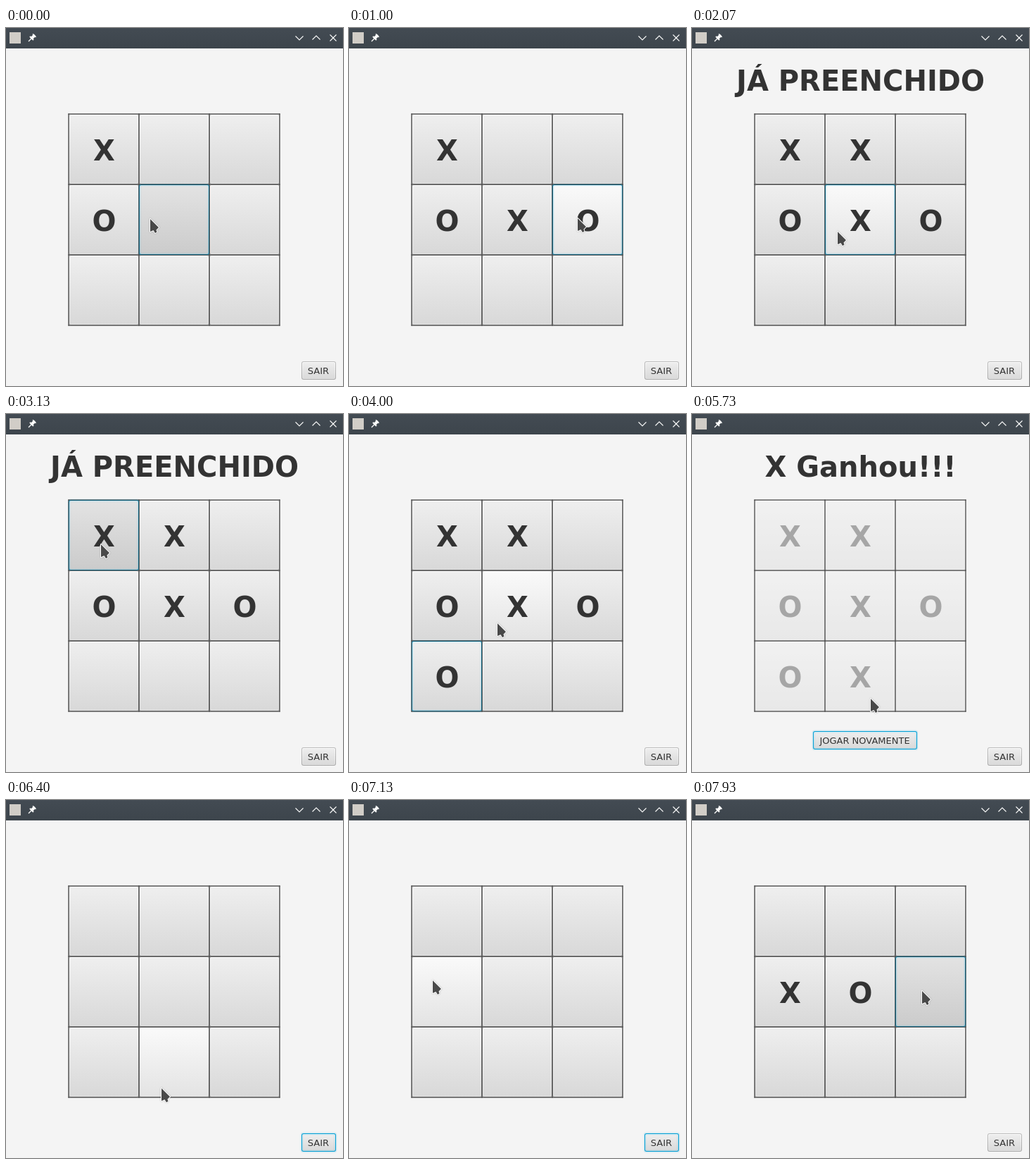
An HTML page with a canvas that plays this animation: 479x508 px, repeating every 8 s.

```html
<!DOCTYPE html>
<html lang="pt">
<head>
<meta charset="utf-8">
<style>
  html, body { margin: 0; width: 100%; height: 100%; overflow: hidden; background: #f4f4f4; }
  canvas { display: block; }
</style>
</head>
<body>
<canvas width="479" height="508"></canvas>
<script>
const ctx = document.querySelector('canvas').getContext('2d');
const LOOP = 8000, STEP = 1000 / 15, CELL = 100, LEFT = 89, TOP = 122;
const BACK = '#f4f4f4', INK = '#333', WHITE = '#fcfcfc';

const cells = Array.from({ length: 9 }, (_, i) => ({
  x: LEFT + i % 3 * CELL, y: TOP + Math.floor(i / 3) * CELL, w: CELL, h: CELL
}));
const again = { x: 172, y: 450, w: 148, h: 26 };
const exit = { x: 420, y: 473, w: 49, h: 26 };

// Mouse clicks; the game itself follows from them.
const clicks = [
  [0, 70, 205, 271], [870, 1000, 327, 271], [1730, 1800, 215, 206], [2060, 2070, 207, 289],
  [3060, 3200, 135, 185], [3530, 3670, 128, 345], [4400, 4530, 227, 288], [5600, 5735, 254, 403],
  [6200, 6330, 252, 456], [7200, 7270, 119, 256], [7670, 7800, 222, 270], [7930, 8070, 327, 271]
].map(([down, up, x, y]) => ({ down, up, x, y }));

const inside = (b, p) => p.x >= b.x && p.x < b.x + b.w && p.y >= b.y && p.y < b.y + b.h;

function hasWon(board, mark) {
  const full = (start, step) => [0, 1, 2].every(k => board[start + k * step] === mark);
  return full(0, 4) || full(2, 2) || [0, 1, 2].some(i => full(i, 3) || full(3 * i, 1));
}

function gameAt(t) {
  const game = { board: [...'X  O     '], turn: 'X', message: '', over: false };
  for (const click of clicks.filter(c => c.down <= t)) {
    game.pressed = t < click.up;
    game.focus = [...cells, again].find(b => inside(b, click));
    if (!game.pressed) play(game);
  }
  return game;
}

function play(game) {
  const { board, turn } = game;
  game.message = '';
  if (game.focus === again) {
    board.fill(' ');
    Object.assign(game, { turn: 'X', over: false, focus: exit });
    return;
  }
  const i = cells.indexOf(game.focus);
  if (board[i] !== ' ') {
    game.message = 'JÁ PREENCHIDO';
    return;
  }
  board[i] = turn;
  game.turn = turn === 'X' ? 'O' : 'X';
  if (hasWon(board, turn)) {
    Object.assign(game, { over: true, focus: again, message: turn + ' Ganhou!!!' });
  }
}

// The pointer leaves on release and glides to a stop at the next click.
function pointerAt(t) {
  const i = clicks.findLastIndex(c => c.down <= t), from = clicks[i];
  const to = clicks[i + 1] || from;
  const p = t < from.up ? 0 : (t - from.up) / (to.down - from.up);
  const e = 1 - (1 - p) ** 3;
  return { x: Math.round(from.x + (to.x - from.x) * e), y: Math.round(from.y + (to.y - from.y) * e) };
}

function vertical({ y, h }, top, bottom) {
  const g = ctx.createLinearGradient(0, y, 0, y + h);
  g.addColorStop(0, top);
  g.addColorStop(1, bottom);
  return g;
}

function layer({ x, y, w, h }, inset, radius, fill) {
  ctx.fillStyle = fill;
  ctx.beginPath();
  ctx.roundRect(x + inset, y + inset, w - 2 * inset, h - 2 * inset, radius);
  ctx.fill();
}

function trace(points) {
  ctx.beginPath();
  points.forEach(([x, y]) => ctx.lineTo(x, y));
}

function line(points, width, color) {
  ctx.strokeStyle = color;
  ctx.lineWidth = width;
  trace(points);
  ctx.stroke();
}

function text(label, x, y, font) {
  ctx.font = `${font} "DejaVu Sans", sans-serif`;
  ctx.textAlign = 'center';
  ctx.fillStyle = INK;
  ctx.fillText(label, x, y);
}

function button(box, focused, pressed, hovered) {
  const [top, bottom] = pressed ? ['#e3e3e3', '#cbcbcb']
    : hovered ? ['#fafafa', '#e3e3e3'] : ['#efefef', '#d8d8d8'];
  const body = vertical(box, top, bottom);
  layer(box, 0, 3, focused ? '#039ed3' : vertical(box, '#bcbcbc', '#a8a8a8'));
  layer(box, 1, 2, pressed ? vertical(box, '#eee', '#d0d0d0') : vertical(box, '#fdfdfd', '#e0e0e0'));
  layer(box, 2, 1, body);
  if (focused) {
    layer(box, -1.4, 4, '#039ed322');
    layer(box, 2.6, 1, body);
  }
}

function titleBar() {
  const bar = { x: 0, y: 0, w: 479, h: 29 };
  layer(bar, 0, 0, vertical(bar, '#434b53', '#3d454c'));
  layer({ x: 5, y: 6, w: 16, h: 16 }, 0, 0, '#d1cdc7');
  line([[32, 19], [38, 13]], 1.2, WHITE);
  line([[34, 12], [39, 17]], 2, WHITE);
  line([[36, 15], [41, 10]], 4, WHITE);
  line([[38, 8.5], [42.5, 13]], 1.5, WHITE);
  line([[411.5, 11.5], [417, 17], [422.5, 11.5]], 1.1, WHITE);
  line([[435.5, 16.5], [441, 11], [446.5, 16.5]], 1.1, WHITE);
  line([[460.5, 9.5], [469.5, 18.5]], 1.1, WHITE);
  line([[469.5, 9.5], [460.5, 18.5]], 1.1, WHITE);
}

function gridLines() {
  for (let d = 0; d <= 3 * CELL; d += CELL) {
    line([[LEFT + d, TOP - 0.5], [LEFT + d, TOP + 300.5]], 1.5, '#1e1e1ea8');
    line([[LEFT - 0.5, TOP + d], [LEFT + 300.5, TOP + d]], 1.5, '#1e1e1ea8');
  }
}

function pointer({ x, y }) {
  ctx.save();
  ctx.translate(x, y);
  trace([[0, 0], [0, 18], [4.5, 16], [7, 20], [9.5, 18.5], [8.5, 15.5], [12, 12]]);
  ctx.closePath();
  ctx.lineJoin = 'round';
  ctx.lineWidth = 2;
  ctx.strokeStyle = '#fff';
  ctx.shadowColor = '#0004';
  ctx.shadowBlur = 2;
  ctx.stroke();
  ctx.shadowColor = 'transparent';
  ctx.fillStyle = '#494949';
  ctx.fill();
  ctx.restore();
}

function draw(t) {
  const { board, focus, pressed, message, over } = gameAt(t), tip = pointerAt(t);
  const show = box => button(box, focus === box, focus === box && pressed, inside(box, tip) && !(over && box !== again));

  layer({ x: 0, y: 0, w: 479, h: 508 }, 0, 0, BACK);
  titleBar();
  text(message, 239.5, 89, 'bold 40px');

  cells.forEach((box, i) => {
    show(box);
    text(board[i], box.x + 50.5, box.y + 66, 'bold 40px');
  });
  // disabled cells fade to 40%
  if (over) layer({ x: LEFT, y: TOP, w: 300, h: 300 }, -1, 0, BACK + '99');
  gridLines();

  if (over) {
    show(again);
    text('JOGAR NOVAMENTE', 245.5, 468, '13px');
  }
  show(exit);
  text('SAIR', 444, 491, '13px');
  pointer(tip);
}

function tick() {
  const frame = Math.floor((performance.now() % LOOP + 4) / STEP);
  draw((frame * STEP + 4) % LOOP);
  requestAnimationFrame(tick);
}
tick();
</script>
</body>
</html>
```
